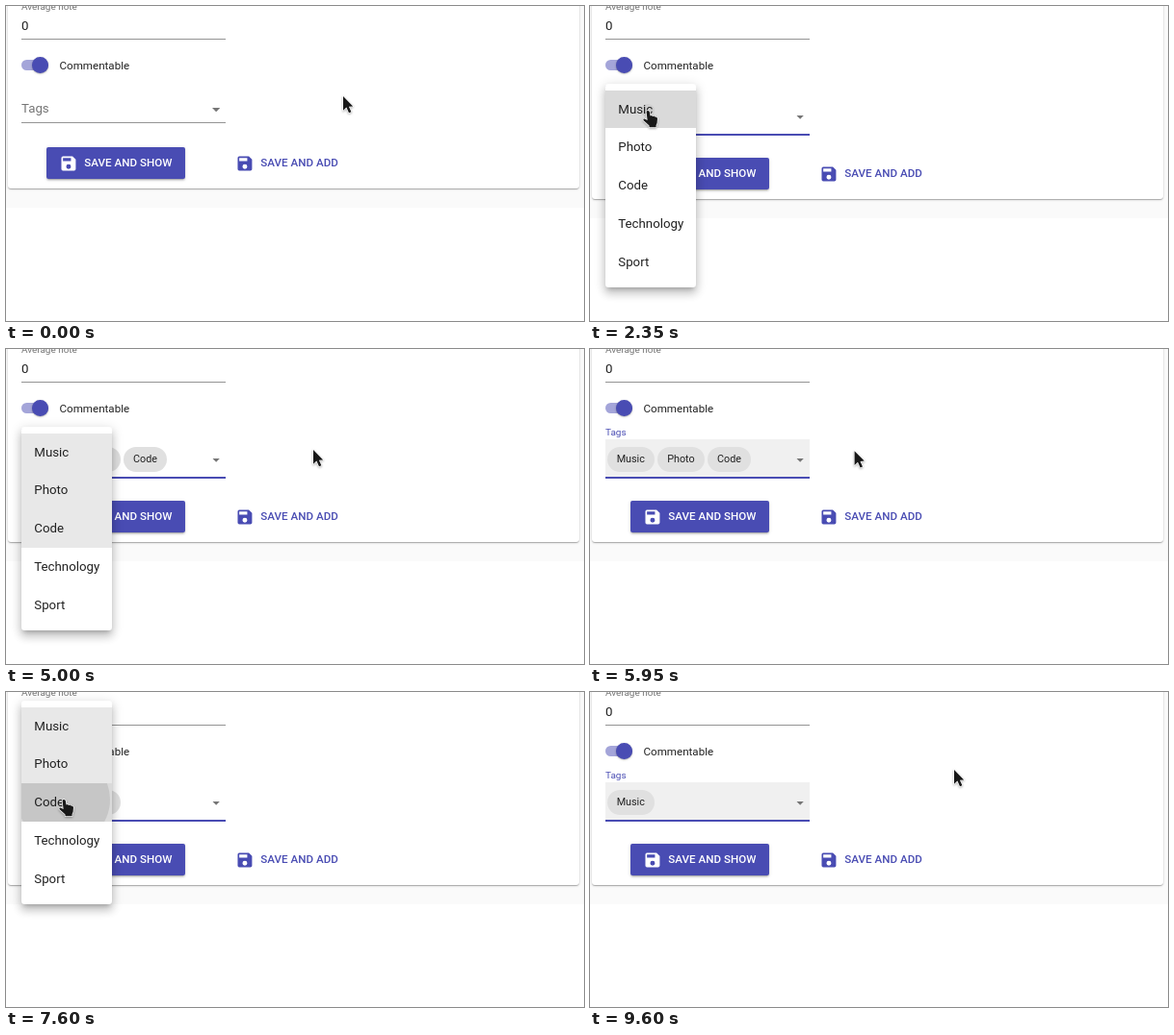
Animation of 600x328 px, one loop 10 s. Source, as an HTML page:

```html
<!DOCTYPE html>
<html lang="en">
<head>
<meta charset="utf-8">
<title>Tag selection</title>
<style>
  :root { --primary: #494cb3; --grey: #757575; }
  html, body { margin: 0; width: 100%; height: 100%; overflow: hidden; background: #fff; }
  body { position: relative; font: 13.27px/20px Roboto, sans-serif; color: #212121; }
  body > *, #lower > *, .button > *, #field > * { position: absolute; white-space: nowrap; }
  #page { left: 0; top: 0; width: 600px; background: #fafafa; }
  #card { left: 2px; top: -20px; width: 593px; background: #fff; border-radius: 3px;
    box-shadow: 0 .8px 2.5px rgba(0,0,0,.2), 0 .8px .8px rgba(0,0,0,.14), 0 1.7px .8px -.8px rgba(0,0,0,.12); }
  .small { font-size: 9.95px; color: var(--grey); }
  .rule { left: 16px; width: 212px; height: 1px; background: #949494; }
  #track { left: 16px; top: 55.7px; width: 28px; height: 11.6px; border-radius: 6px; background: var(--primary); opacity: .5; }
  #thumb { left: 27.3px; top: 53.2px; width: 16.6px; height: 16.6px; border-radius: 50%; background: var(--primary);
    box-shadow: 0 .8px 2.5px rgba(0,0,0,.2), 0 .8px .8px rgba(0,0,0,.14); }
  #field { left: 16px; top: 94px; width: 212px; }
  #chips { left: 0; top: 7.5px; display: flex; }
  .chip { height: 26.5px; margin: 0 1.66px; padding: 0 10px; border-radius: 14px; background: #e0e0e0;
    font-size: 10.8px; line-height: 26.5px; }
  #arrow { left: 198px; width: 8.3px; height: 4.15px; background: var(--grey); clip-path: polygon(0 0, 100% 0, 50% 100%); }
  #line { left: 0; bottom: 0; width: 212px; }
  #focus { left: 0; bottom: 0; width: 212px; height: 2px; background: var(--primary); }
  #label { left: 16px; top: 97px; transform-origin: 0 50%; }
  #lower { left: 0; top: 0; }
  .button { top: 147px; height: 33px; border-radius: 2px; color: var(--primary);
    font-size: 11.6px; font-weight: 500; line-height: 33px; }
  .button svg { left: 13px; top: 6.7px; width: 19.9px; height: 19.9px; fill: currentColor; }
  .button span { left: 39.3px; }
  .filled { color: #fff; background: var(--primary);
    box-shadow: 0 2.5px .8px -1.7px rgba(0,0,0,.2), 0 1.7px 1.7px rgba(0,0,0,.14), 0 .8px 4px rgba(0,0,0,.12); }
  #menu { left: 16px; width: 94px; padding: 6.6px 0; background: #fff; border-radius: 3.3px;
    box-shadow: 0 4px 4px -2.5px rgba(0,0,0,.2), 0 6.6px 8px 1px rgba(0,0,0,.14), 0 2.5px 11.6px 1.7px rgba(0,0,0,.12); }
  .item { position: relative; overflow: hidden; height: 39.8px; padding-left: 13.3px; line-height: 39.8px; }
  .ripple { position: absolute; border-radius: 50%; background: #000; }
  #cursor { left: 0; top: 0; width: 1px; height: 1px; overflow: visible; filter: drop-shadow(.5px 1px 1px rgba(0,0,0,.3)); }
  #cursor path { fill: #181818; stroke: #fff; stroke-width: 1.4; stroke-linejoin: round; paint-order: stroke; }
</style>
</head>
<body>
<div id="page"></div>
<div id="card"></div>
<div class="small" style="left:16px;top:-9px">Average note</div>
<div style="left:16px;top:11px">0</div>
<div class="rule" style="top:34px"></div>
<div id="track"></div>
<div id="thumb"></div>
<div style="left:55.5px;top:51.5px;font-size:11.6px">Commentable</div>
<div id="field">
  <div id="chips"></div>
  <div id="arrow"></div>
  <div id="line"></div>
  <div id="focus"></div>
</div>
<div id="label">Tags</div>
<div id="lower"></div>
<div id="menu"></div>
<svg id="cursor"><path/></svg>
<script>
const LOOP = 10000, HOLD = 30, RIPPLE = 550;
const ROW = 39.8, PAD = 6.6;
const tags = ['Music', 'Photo', 'Code', 'Technology', 'Sport'];
const moves = [ // start, end, x, y
  [50, 450, 114, 100], [1850, 2050, 60, 109], [2600, 2750, 56, 149],
  [3800, 4000, 39.5, 195], [4700, 5000, 319, 105], [5862, 6200, 60, 112],
  [8000, 8200, 60, 78], [8700, 8950, 378, 81]
];
const clicks = [[2320, 0], [2990, 1], [4350, 2], [7310, 2], [8350, 1]]; // time, tag
const menus = [{ open: 650, close: 5200, top: 81, origin: 26 }, { open: 6450, close: 9050, top: 9, origin: 106 }];
const focusIn = [600, 5500, 9400], focusOut = [5200, 9050];
const ARROW = 'M0 0V14.8L3.4 11.6L6 17.2L8.4 16.2L5.9 10.8L10.2 10.4Z';
const HAND = 'M-1.5 .8Q0-1 1.7 .8L2.6 5.5L4 5L5.2 6L6.8 5.6L7.8 6.8L9 6.6L10 8L9.6 13L8.6 15V17.2H1.5V15.5L-4.6 10Q-5 8.4-3.4 8.6L-.4 10Z';
const SAVE = 'M17 3H5a2 2 0 0 0-2 2v14a2 2 0 0 0 2 2h14a2 2 0 0 0 2-2V7zm-5 16a3 3 0 1 1 0-6a3 3 0 0 1 0 6zm3-10H5V5h10z';

const $ = id => document.getElementById(id);
const ramp = (t, start, length) => Math.min(1, Math.max(0, (t - start) / length));
const out = p => 1 - (1 - p) ** 3;
const smooth = p => p * p * (3 - 2 * p);
const sum = (list, f) => list.reduce((total, v) => total + f(v), 0);

const button = (text, left, width, style) =>
  `<div class="button ${style}" style="left:${left}px;width:${width}px">
    <svg viewBox="0 0 24 24"><path d="${SAVE}"/></svg><span>${text}</span></div>`;
$('lower').innerHTML = button('SAVE AND SHOW', 42, 143.5, 'filled') + button('SAVE AND ADD', 225, 134, '');
$('chips').innerHTML = tags.map(tag => `<div class="chip">${tag}</div>`).join('');
$('menu').innerHTML = tags.map(tag => `<div class="item">${tag}<div class="ripple"></div></div>`).join('');
const chips = [...$('chips').children], items = [...$('menu').children];

function pointer(t) {
  let x = 350, y = 94;
  for (const [start, end, toX, toY] of moves) {
    const p = smooth(ramp(t, start, end - start));
    x += (toX - x) * p;
    y += (toY - y) * p;
  }
  return { x, y };
}

function drawMenu(t, menu, { x, y }, selected) {
  const shown = out(ramp(t, menu.open, 300)) * (1 - smooth(ramp(t, menu.close, 300)));
  const grown = out(ramp(t, menu.open, 200)) * (1 - smooth(ramp(t, menu.close + 100, 200)));
  const style = $('menu').style;
  style.top = menu.top + 'px';
  style.opacity = shown;
  style.transformOrigin = `0 ${menu.origin}px`;
  style.transform = grown < 1 ? `scale(${.75 + .25 * grown}, ${.5625 + .4375 * grown})` : 'none';

  const open = t >= menu.open && t < menu.close;
  const over = open && x > 16 && x < 110 ? Math.floor((y - menu.top - PAD) / ROW) : -1;
  items.forEach((item, i) => {
    item.style.background = i === over ? '#dadada' : selected[i] ? '#e8e8e8' : 'none';
    const click = clicks.find(([time, tag]) => tag === i && t >= time && t < time + HOLD + RIPPLE);
    const ripple = item.lastChild.style;
    ripple.display = click ? 'block' : 'none';
    if (!click) return;
    const at = pointer(click[0]);
    const radius = 62 * (1 - (1 - ramp(t, click[0], RIPPLE)) ** 2);
    ripple.left = at.x - 16 - radius + 'px';
    ripple.top = at.y - menu.top - PAD - i * ROW - radius + 'px';
    ripple.width = ripple.height = 2 * radius + 'px';
    ripple.opacity = .18 * ramp(t, click[0], 100) * (1 - ramp(t, click[0] + HOLD, RIPPLE));
  });
  return { open, over };
}

function draw(t) {
  const at = pointer(t);
  const selected = tags.map((_, i) =>
    clicks.filter(([time, tag]) => tag === i && t >= time + HOLD).length % 2);
  const filled = selected.some(Boolean), shift = filled ? 11 : 0;
  const { open, over } = drawMenu(t, t < menus[1].open ? menus[0] : menus[1], at, selected);

  $('page').style.height = 210 + shift + 'px';
  $('card').style.height = 210 + shift + 'px';
  $('lower').style.transform = `translateY(${shift}px)`;
  chips.forEach((chip, i) => chip.style.display = selected[i] ? 'block' : 'none');

  const fade = time => out(ramp(t, time, 200));
  const focus = sum(focusIn, fade) - sum(focusOut, fade);
  const overField = !open && at.x > 16 && at.x < 228 && at.y > 94 && at.y < 134;
  const resting = (t >= 5500 && t < 6450) || t >= 9400;
  $('field').style.height = filled ? '41px' : '28px';
  $('field').style.background = resting ? '#f0f0f0' : 'none';
  $('arrow').style.top = filled ? '19.5px' : '12px';
  $('line').style.height = overField ? '2px' : '1px';
  $('line').style.background = overField ? '#212121' : '#949494';
  $('focus').style.transform = `scaleX(${focus})`;

  const lift = fade(600);
  $('label').style.transform = `translateY(${-20 * lift}px) scale(${1 - .25 * lift})`;
  $('label').style.color = `color-mix(in srgb, var(--primary) ${focus * 100}%, var(--grey))`;

  const shape = $('cursor').firstChild;
  shape.setAttribute('d', over >= 0 && over < tags.length || overField ? HAND : ARROW);
  shape.setAttribute('transform', `translate(${at.x} ${at.y})`);
}

const begin = performance.now();
function tick() {
  draw((performance.now() - begin) % LOOP);
  requestAnimationFrame(tick);
}
tick();
</script>
</body>
</html>
```
